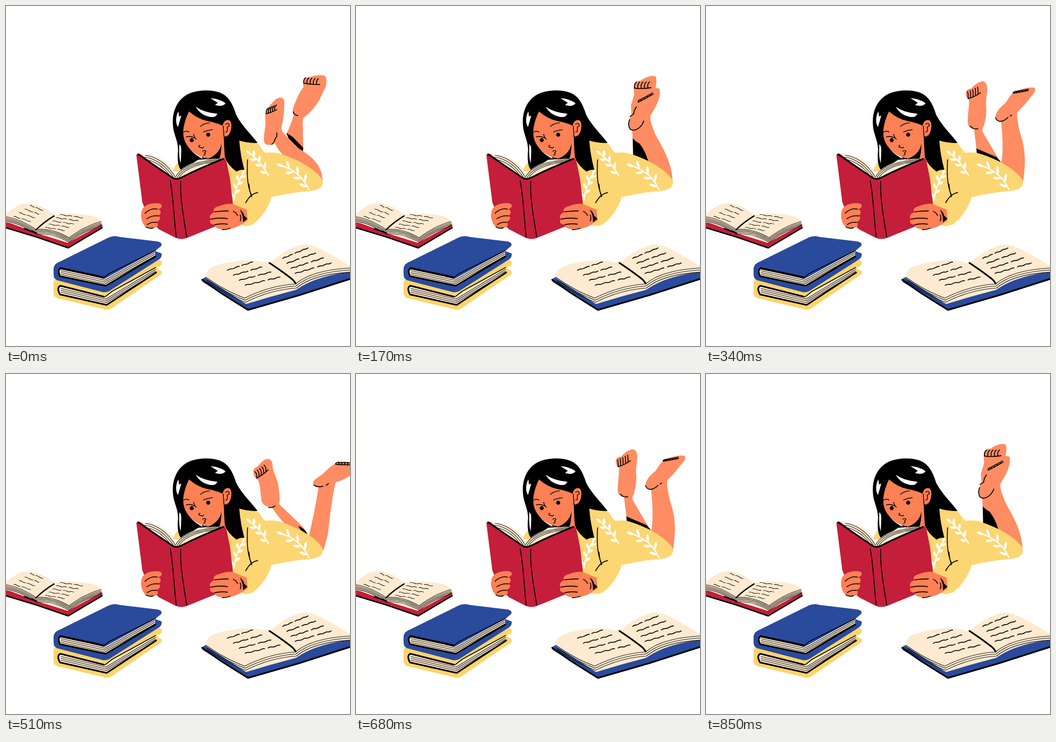
An HTML page that plays this animation: 752x745 px, repeating every 1020 ms.

```html
<!DOCTYPE html>
<html lang="en">
<head>
<meta charset="utf-8">
<title>Reading</title>
<style>
html, body { margin: 0; width: 100%; height: 100%; overflow: hidden; background: #fff; }
svg { display: block; width: 100%; height: 100%; }
.skin { fill: #ff8c62; }
.face { fill: #fe8055; }
.dress { fill: #fcd672; }
.gold { fill: #fdd36c; }
.red { fill: #c41e3a; }
.blue { fill: #2a4a9c; }
.page { fill: #fdead0; }
.ink { fill: #000; }
.white { fill: #fff; }
.line, .thin, .bold { fill: none; stroke: #000; stroke-linecap: round; stroke-linejoin: round; stroke-width: 1.9; }
.thin { stroke-width: 1.1; }
.bold { stroke-width: 3.6; }
.stem { fill: none; stroke: #fff; stroke-width: 2.6; stroke-linecap: round; }
</style>
</head>
<body>
<svg viewBox="0 0 752 745" preserveAspectRatio="none">
  <g class="pose" id="apart">
    <path class="skin" d="M650 178C648 165 651 156 664 156C672 152 690 150 697 153C702 157 701 168 699 177C695 185 690 195 685 206C674 224 661 238 650 245Q648 252 649 268L650 322L613 281Q622 262 629 239C624 232 628 221 632 212C636 202 641 190 650 178Z"/>
    <path class="ink" d="M613 278L627 287L650 311L648 322L632 314Q621 301 613 278Z"/>
    <path class="skin" d="M568 232C572 222 582 212 590 204C597 199 607 199 608 208C609 225 607 245 603 262C600 271 604 276 610 282L640 312C666 328 692 348 692 384L608 330Q594 314 587 300C582 306 570 306 565 300C562 290 565 277 567 262C568 250 565 240 568 232Z"/>
    <path class="line" d="M628 232Q630 239 638 240M581 303C588 300 586 291 592 286V278"/>
  </g>
  <g class="pose" id="crossed">
    <path class="skin" d="M607 179C607 166 614 163 622 164C630 157 645 151 654 154C658 158 657 168 655 178L640 240L636 340H606L604 270L601 218L608 195Z"/>
    <path class="ink" d="M605 290Q611 297 621 302Q632 318 640 342L606 330Z"/>
    <path class="skin" d="M608 222C614 206 624 196 638 188C646 181 658 177 664 182C667 203 653 224 644 240C641 248 648 264 653 278C664 302 691 338 692 384L640 345C638 322 622 305 610 288L604 273C595 272 595 261 598 248Z"/>
    <path class="line" d="M613 221Q607 230 607 237L599 242M598 249C594 260 596 273 607 272C617 271 626 262 629 252"/>
  </g>
  <g class="pose" id="open">
    <path class="skin" d="M568 190C568 184 575 181 580 181C586 172 598 165 606 165C613 167 615 175 615 183C614 195 612 205 612 215C614 230 612 245 608 260C606 268 601 270 607 280L643 341L592 320L586 270C578 269 573 264 572 255C572 240 575 225 575 205C570 202 568 198 568 190Z"/>
    <path class="ink" d="M591 312Q611 321 635 331L645 342L620 338L592 323Z"/>
    <path class="skin" d="M633 240C636 228 646 220 655 212C662 202 666 194 674 188C690 181 708 177 718 179C722 184 718 191 710 199C702 210 692 222 681 232C678 240 682 258 687 280C698 310 700 345 693 384L645 348C650 320 649 290 645 254C637 254 631 248 633 240Z"/>
    <path class="line" d="M578 263Q584 271 594 269M633 245Q637 255 648 252Q656 249 660 244M665 241L668 239"/>
  </g>
  <g class="pose" id="wide">
    <path class="skin" d="M541 215C540 208 545 204 550 203C556 195 565 186 572 186C580 187 583 193 583 201C582 210 589 220 594 238C598 258 599 275 597 285L650 336L662 356L608 327C595 312 585 298 580 291C568 291 558 285 558 272C556 260 556 245 551 232C546 230 541 224 541 215Z"/>
    <path class="ink" d="M639 333Q650 337 657 347L661 357L648 349Z"/>
    <path class="skin" d="M672 240C670 234 677 230 690 221C702 210 712 200 722 195Q735 190 756 194V220C742 230 730 235 721 237C715 255 712 290 708 310C706 340 701 367 693 388L662 356C668 330 677 290 683 248C676 248 673 246 672 240Z"/>
    <path class="line" d="M574 292Q582 294 588 289M673 243Q680 249 693 246M700 244L705 240"/>
  </g>

  <!-- dress -->
  <path class="dress" d="M366 362Q369 346 378 342L400 366ZM478 332L509 296Q532 297 550 301C558 309 562 320 568 322C590 317 613 328 640 340C662 352 690 370 693 386C693 399 680 404 660 406C630 408 602 414 580 419C576 440 556 467 540 478Q526 485 513 480L520 468L512 445L497 440L480 400Z"/>
  <g id="leaves"></g>
  <path class="line" d="M528 337C527 360 526 392 536 413M531 390Q533 409 537 418M550 409Q535 411 524 431"/>

  <!-- head -->
  <path class="ink" d="M365 262C362 224 380 199 405 190C430 182 460 184 476 194C491 204 498 222 503 238C515 262 535 280 550 300Q530 301 510 295Q512 325 521 359Q511 358 504 363Q486 350 479 333L420 337L384 361Q373 350 376 318C377 295 366 282 365 262Z"/>
  <path class="face" d="M471 290L476 280Q477 318 479 336L440 338V325Z"/>
  <path class="ink" d="M471 301Q467 326 438 336H466Q471 322 471 301Z"/>
  <path class="white" d="M396 302Q404 322 430 335L424 322Z"/>
  <path class="face" d="M400 231Q418 247 440 252Q462 256 475 263Q479 285 470 303C462 321 449 334 437 333C420 331 398 314 391 296C383 276 390 252 400 231Z"/>
  <path class="face" d="M473 264C475 252 482 248 489 251C496 258 492 275 487 282C483 286 478 288 475 283Z"/>
  <path class="line" style="stroke-width:1.6" d="M475 263Q476 281 477 291M480 259Q488 254 488 263Q482 264 484 270Q485 276 480 276M388 277Q393 272 400 276M425 264Q432 257 445 256M394 287Q403 284 412 289M432 276Q441 272 451 271M410 281Q412 288 416 292M424 305Q418 309 426 310Q430 313 432 309M430 318Q437 315 437 319L434 322Q438 325 432 327"/>
  <circle class="ink" cx="406" cy="294" r="4.4"/>
  <circle class="ink" cx="442" cy="282" r="4.4"/>
  <path class="white" d="M415 221Q434 234 462 236Q459 245 446 243Q425 239 415 221ZM447 202Q466 203 480 213Q474 222 457 217L463 212ZM377 231C371 240 370 258 376 265Q380 252 383 240L378 242ZM379 303Q384 306 383 322L382 345Q377 330 379 303Z"/>

  <!-- red book in hand -->
  <path class="page" d="M303 326C322 325 345 336 359 350Q368 360 370 375Q377 359 396 350C420 337 452 333 476 335L383 379H366Z"/>
  <g id="heldPages"></g>
  <path class="red" d="M285 327Q286 322 293 324L365 378Q374 382 383 377C412 362 442 348 475 334Q481 334 482 341L490 380L499 462L465 480L396 508Q384 513 371 508L334 489L312 466L298 430Z"/>
  <path class="bold" d="M289 325L365 377Q374 381 383 376C412 361 442 348 475 335"/>
  <path class="line" d="M359 383C366 420 367 462 372 506M382 384C380 420 389 468 395 506"/>

  <!-- hands -->
  <path class="face" d="M298 445C305 433 325 430 337 433C344 437 340 443 333 445C341 449 339 457 333 459C340 464 336 471 329 473C335 479 331 487 322 486C310 490 300 482 297 470C294 462 295 452 298 445Z"/>
  <path class="line" d="M331 445Q317 442 304 454M333 460Q320 458 308 466M329 474Q317 473 309 479M306 484Q313 489 322 486"/>
  <path class="face" d="M457 451C450 447 456 441 464 439C477 434 488 432 497 434Q511 441 526 446L528 470C514 478 505 488 484 489C466 491 455 486 457 479C444 479 444 470 449 467C442 463 446 455 457 451Z"/>
  <path class="ink" d="M511 446Q518 450 521 460L528 466L518 474Q519 458 511 446Z"/>
  <path class="line" d="M457 451Q470 449 486 449M449 467Q466 463 484 466M457 479Q471 476 484 478M497 450Q504 453 506 459M473 490Q483 490 490 487M512 458Q515 465 512 471"/>

  <!-- open red book -->
  <path class="red" d="M0 472L66 497L135 518L210 476L211 486L136 531L66 506L0 486Z"/>
  <path class="page" d="M0 456C12 446 25 436 37 433C62 429 86 440 106 459C130 451 152 456 177 458Q197 460 205 468L210 478L135 519L65 497Q30 478 0 474Z"/>
  <g id="redPages"></g>
  <path class="bold" style="stroke-width:3" d="M0 486L66 506L136 530L210 486M66 490Q82 474 105 460M40 488L66 497"/>

  <!-- stack -->
  <path class="gold" d="M104 608Q104 600 112 598L215 620L335 556Q344 560 339 568L328 574L340 581Q343 586 336 590L230 663Q222 667 213 664L112 640Q104 637 104 628Z"/>
  <path class="page" d="M119 613L217 637L327 573L328 584L220 655L118 632Q112 620 119 613Z"/>
  <path class="bold" d="M328 584L220 655L118 632Q110 617 119 613L214 637"/>
  <path class="blue" d="M104 574Q106 564 118 560L225 507Q237 502 248 506L332 516Q343 519 339 526L326 537L340 542Q342 549 335 555L225 625Q216 629 208 626L112 601Q104 598 104 588Z"/>
  <path class="page" d="M120 575L215 598L326 537V549L219 613L118 592Q112 581 120 575Z"/>
  <path class="bold" d="M326 549L218 613L118 592Q112 579 119 575L212 595" />
  <path class="bold" d="M119 574L212 594"/>
  <path class="line" d="M212 597L224 587L326 536M217 637L232 625L327 573"/>
  <g id="stackPages"></g>

  <!-- open blue book -->
  <path class="blue" d="M429 598L438 593L528 640L633 618Q690 590 752 582V600L640 634L530 667L429 604Z"/>
  <path class="page" d="M436 588L444 576C458 567 482 562 505 559C530 555 555 558 576 564C596 546 620 529 648 523C670 520 695 537 722 551L752 570V583Q680 590 634 622Q580 636 525 653L438 597Z"/>
  <g id="bluePages"></g>
  <path class="bold" d="M429 600L470 629L529 666L640 634L752 598M576 563Q600 579 617 592Q630 601 633 608"/>
  <g id="text"></g>
</svg>
<script>
const STEP = 170;
const ORDER = ['apart', 'crossed', 'open', 'wide', 'open', 'crossed'];
const poses = [...document.querySelectorAll('.pose')];

let seed = 7;
const rand = () => (seed = seed * 16807 % 2147483647) / 2147483647;
const mix = (a, b, k) => a + (b - a) * k;

function add(id, cls, d) {
  const path = document.createElementNS('http://www.w3.org/2000/svg', 'path');
  path.setAttribute('class', cls);
  path.setAttribute('d', d);
  document.getElementById(id).append(path);
  return path;
}

// A line under the toes with short gaps leaning out of it.
function toes(id, x1, y1, x2, y2, dx, dy) {
  let d = `M${x1} ${y1}Q${(x1 + x2) / 2 - dx * .2} ${(y1 + y2) / 2 - dy * .2} ${x2} ${y2}`;
  for (let i = 0; i < 5; i++) {
    const k = i / 5, x = mix(x1, x2, k), y = mix(y1, y2, k);
    d += `M${x} ${y}q${-dx * .3} ${dy * .7} ${dx} ${dy}`;
  }
  add(id, 'line', d);
}

// Copies of one edge, shifted step by step: the sheets of a book.
function sheets(id, d, count, dx, dy) {
  for (let i = 0; i < count; i++) {
    add(id, 'thin', d).setAttribute('transform', `translate(${i * dx} ${i * dy})`);
  }
}

// Leaves alternate along a curved stem and lean towards its tip.
function sprig(x0, y0, cx, cy, x1, y1, size) {
  add('leaves', 'stem', `M${x0} ${y0}Q${cx} ${cy} ${x1} ${y1}`);
  for (let i = 0; i < 7; i++) {
    const k = .08 + i * .15;
    const x = mix(mix(x0, cx, k), mix(cx, x1, k), k);
    const y = mix(mix(y0, cy, k), mix(cy, y1, k), k);
    const side = i === 6 ? 0 : i % 2 ? .75 : -.75;
    const angle = Math.atan2(mix(cy - y0, y1 - cy, k), mix(cx - x0, x1 - cx, k)) + side;
    const turn = angle * 180 / Math.PI;
    add('leaves', 'white', `M0 0Q${size * .6} -7 ${size} 0Q${size * .6} 5 0 0`)
      .setAttribute('transform', `translate(${x} ${y}) rotate(${turn})`);
  }
}

// Rows of wavy dashes standing for print; each row is a little longer or shorter.
function print(x, y, stepX, stepY, dx, dy, grow, rows, cls) {
  for (let r = 0; r < rows; r++) {
    const w = dx + grow * r, gap = mix(.35, .65, rand());
    let d = '';
    for (const [a, b] of [[0, gap - .04], [gap + .06, 1]]) {
      const n = Math.max(2, Math.round((b - a) * w / 8));
      const sx = w * (b - a) / n, sy = dy * (b - a) / n;
      d += `M${x + stepX * r + w * a} ${y + stepY * r + dy * a}`;
      for (let i = 0; i < n; i++) {
        d += `q${sx / 2} ${sy / 2 + (i % 2 ? 1.6 : -1.6)} ${sx} ${sy}`;
      }
    }
    add('text', cls, d);
  }
}

toes('apart', 651, 169, 686, 172, 4, -12);
toes('apart', 569, 236, 592, 227, 4, -12);
toes('crossed', 609, 180, 645, 179, 4, -13);
toes('crossed', 617, 211, 650, 193, 5, -6);
toes('open', 573, 203, 600, 190, -1, -15);
toes('open', 672, 191, 705, 185, 6, -4);
toes('wide', 548, 228, 573, 210, -4, -14);
toes('wide', 721, 198, 753, 199, 7, -5);

sprig(498, 426, 504, 390, 517, 369, 14);
sprig(574, 371, 555, 340, 537, 326, 16);
sprig(662, 402, 646, 366, 608, 352, 20);

sheets('heldPages', 'M304 327Q345 333 370 375', 3, -2, 4);
sheets('heldPages', 'M371 374Q389 341 474 335', 3, 3, 2);
sheets('redPages', 'M0 462Q30 466 66 490Q100 486 138 508Q168 484 208 472', 4, 0, 3.2);
sheets('stackPages', 'M120 580L216 601L325 540', 3, 0, 4);
sheets('stackPages', 'M120 619L219 642L327 577', 3, 0, 4);
sheets('bluePages', 'M438 595Q480 625 522 640Q575 613 633 609Q668 579 752 574', 3, 1, 4.5);

print(53, 437, -12, 8, 28, 11, 3, 4, 'thin');
print(118, 457, -8, 7, 50, 7, -2, 5, 'thin');
print(484, 579, 13, 11, 55, -18, 7, 4, 'line');
print(605, 553, 9, 11, 55, -23, 8, 4, 'line');

function draw(time) {
  const id = ORDER[Math.floor(time / STEP) % ORDER.length];
  poses.forEach(g => g.style.display = g.id === id ? '' : 'none');
}

let start;
function tick(now) {
  start ??= now;
  draw(Math.max(0, now - start));
  requestAnimationFrame(tick);
}
draw(0);
requestAnimationFrame(tick);
</script>
</body>
</html>
```
